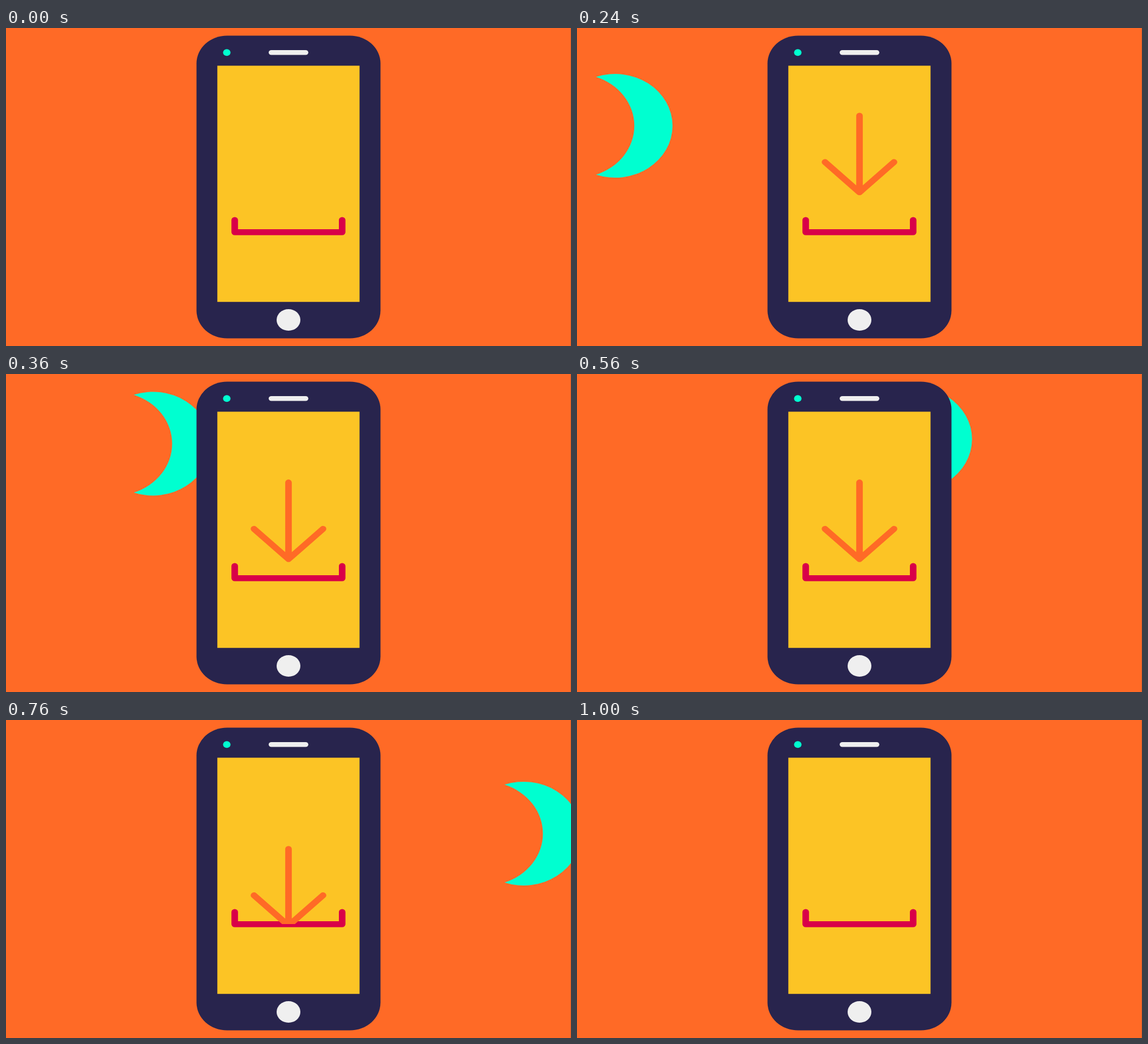
Animation, 998 px wide and 561 px high, one loop 1040 ms. Source, as an HTML page:

```html
<!DOCTYPE html>
<html lang="en">
<head>
<meta charset="utf-8">
<title>Download</title>
<style>
  html, body { margin: 0; width: 100%; height: 100%; overflow: hidden; background: #ff6a26; }
  svg { display: block; width: 100%; height: 100%; }
  .line { fill: none; stroke-width: 11.6; stroke-linecap: round; stroke-linejoin: round; }
</style>
</head>
<body>
<svg viewBox="0 0 998 561">
  <defs>
    <clipPath id="slot"><rect x="374" y="133" width="250" height="227"/></clipPath>
  </defs>
  <rect width="998" height="561" fill="#ff6a26"/>
  <rect x="997" width="1" height="561" fill="#d65f2a"/>

  <path id="moon" fill="#00ffd0"
    d="M-33.5-86.3A101.5 91.5 0 1 1-33.5 86.3A101.5 91.5 0 0 0-33.5-86.3Z"/>

  <rect x="336.5" y="13.5" width="325" height="534" rx="54" ry="49" fill="#28244d"/>
  <rect x="373.3" y="66.5" width="251.2" height="416.7" fill="#fcc425"/>
  <rect x="464" y="39" width="70" height="8.5" rx="4.7" ry="4.25" fill="#efefef"/>
  <ellipse cx="390" cy="43.2" rx="6.6" ry="6" fill="#00ffd0"/>
  <ellipse cx="499" cy="515" rx="21" ry="19" fill="#efefef"/>

  <g transform="translate(499 360.3) scale(1 .9)">
    <path class="line" stroke="#d90048" d="M-95-24V0H94.8V-24"/>
  </g>
  <g clip-path="url(#slot)">
    <g id="arrow">
      <path class="line" stroke="#ff6a26" d="M0-156.3V-6M-61-65.3L0-6L61-65.3"/>
    </g>
  </g>
</svg>
<script>
  const LOOP = 1040, STEP = 40;
  const moon = document.getElementById('moon');
  const arrow = document.getElementById('arrow');

  // Eased progress from 0 to 1 between times a and b
  const ease = (t, a, b) => {
    const s = Math.min(1, Math.max(0, (t - a) / (b - a)));
    return s * s * (3 - 2 * s);
  };

  // The moon's arc is symmetric about t = 480
  const moonAt = t => {
    const u = (t - 480) / STEP, q = u * u;
    return [461 + u * (67.7 - 0.045 * q - 0.00032 * q * q),
            108.9 + 1.49 * q + 0.0077 * q * q];
  };

  // Arrow tip: drops in, rests above the tray, drops out
  const tipAt = t => 120 + 212 * ease(t, -10, 330) + 182 * ease(t, 644, 1050);

  function draw(now) {
    const t = Math.floor((now % LOOP) / STEP) * STEP;
    const [x, y] = moonAt(t);
    moon.setAttribute('transform', `translate(${x} ${y})`);
    arrow.setAttribute('transform', `translate(499 ${tipAt(t)}) scale(1 .9)`);
  }

  const start = performance.now();
  function tick() {
    draw(performance.now() - start);
    requestAnimationFrame(tick);
  }
  tick();
</script>
</body>
</html>
```
